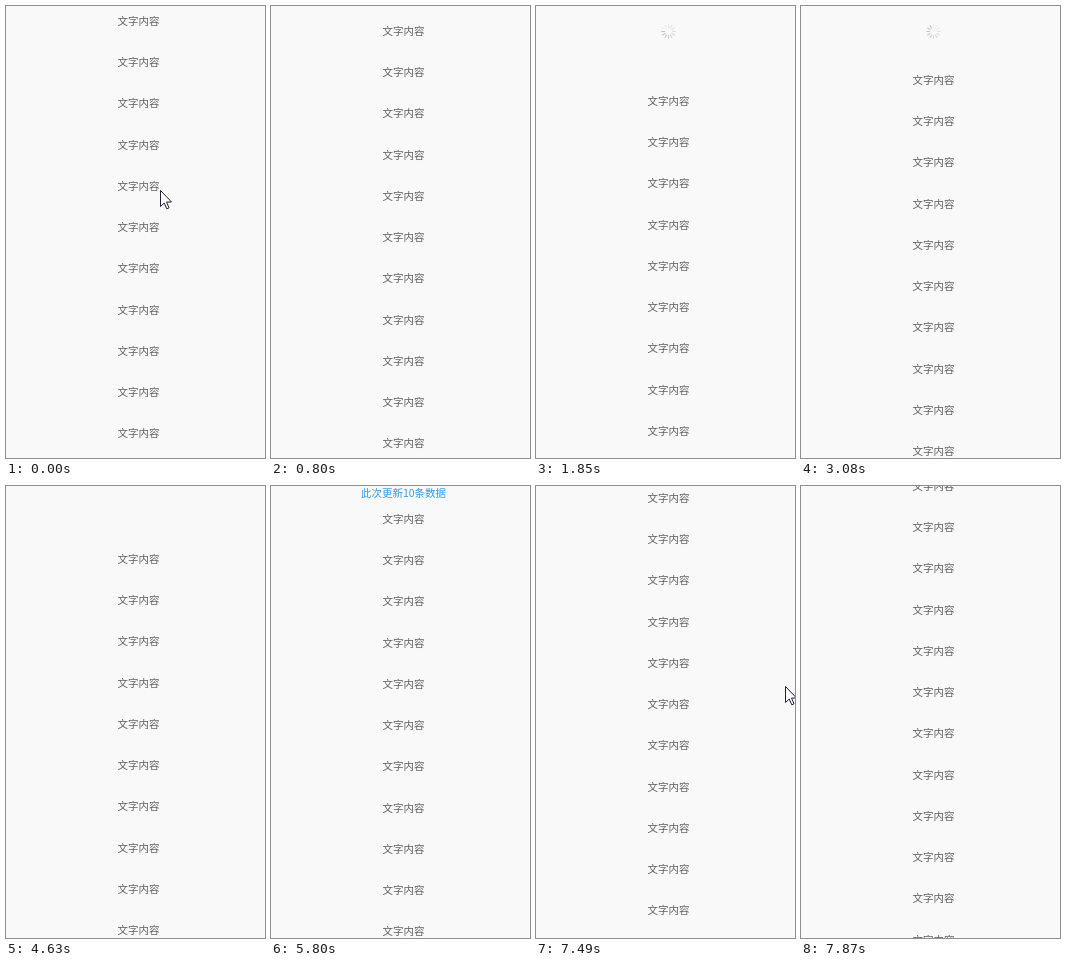
An HTML page that plays this animation: 259 px wide and 452 px high, repeating every 8 s.

```html
<!DOCTYPE html>
<html lang="zh">
<head>
<meta charset="utf-8">
<title>Pull to refresh</title>
<style>
  html, body { margin: 0; width: 100%; height: 100%; overflow: hidden; background: #f9f9f9; }
  #stage {
    position: relative; width: 259px; height: 452px; overflow: hidden;
    font: 10.5px "Noto Sans CJK SC", "Noto Sans CJK", "Noto Sans CJK JP", sans-serif;
    text-align: center; white-space: nowrap;
  }
  #list, #notice { position: absolute; left: 0; width: 265px; }
  #list { top: -6.1px; color: #606060; }
  #list div { height: 41.25px; line-height: 41.25px; }
  #notice { top: -1px; height: 15px; line-height: 15px; color: #2f9ae6; }
  svg { position: absolute; left: 0; top: 0; overflow: visible; }
</style>
</head>
<body>
<div id="stage">
  <div id="list"></div>
  <div id="notice">此次更新10条数据</div>
  <svg width="259" height="452">
    <g id="spinner" stroke="#a8a8a8" stroke-width="1.2" stroke-linecap="round"></g>
    <path id="cursor" d="M.5 .5V16.5L4.2 13L6.8 18.8L9 17.8L6.5 12H11.5Z"
          fill="#fff" stroke="#20203c" stroke-width="1"/>
  </svg>
</div>
<script>
const LOOP = 8000;
const REST = 59.25;
const NOTICE_HEIGHT = 18;

// Moments at which the picture refreshes.
const ticks = [
  0, 150, 270, 390, 510, 660, 800, 940, 1070, 1190, 1330, 1460, 1580, 1730, 1850,
  2000, 2120, 2240, 2390, 2540, 2660, 2810, 2930, 3080, 3200, 3320, 3470, 3610, 3760, 3910,
  4060, 4210, 4360, 4480, 4630, 4750, 4900, 5020, 5320, 5440, 5560, 5680, 5800,
  6410, 6540, 6660, 7360, 7490, 7610, 7730, 7870
];

const linear = p => p;
const easeIn = p => p * p;
const easeOut = p => 1 - (1 - p) ** 2;
const smooth = p => p * p * (3 - 2 * p);

// List offset: start, end, from, to, easing
const moves = [
  [660, 1190, 0, 38, linear],
  [1190, 1580, 38, 130, easeOut],
  [1580, 2000, 130, REST, smooth],
  [4580, 5020, REST, NOTICE_HEIGHT, smooth],
  [6340, 6660, NOTICE_HEIGHT, -0.7, smooth],
  [7230, 7870, -0.7, -14.7, easeIn]
];

const byId = id => document.getElementById(id);
const list = byId('list'), notice = byId('notice');
const spinner = byId('spinner'), cursor = byId('cursor');

list.innerHTML = '<div>文字内容</div>'.repeat(13);
spinner.innerHTML = Array.from({ length: 12 }, (_, i) =>
  `<path d="M0 -4V-6.8" transform="rotate(${i * 30})" opacity="${0.12 + i * 0.05}"/>`).join('');

const progress = (t, start, end) => Math.min(1, Math.max(0, (t - start) / (end - start)));
const show = (el, on) => { el.style.visibility = on ? 'visible' : 'hidden'; };

function listOffset(t) {
  let y = 0;
  for (const [start, end, from, to, ease] of moves) {
    if (t >= start) y = from + (to - from) * ease(progress(t, start, end));
  }
  return y;
}

function cursorPosition(t) {
  if (t < 660) {
    const p = progress(t, 0, 510);
    return [154 - 72 * p * (1 - p), 184 - 199 * p];
  }
  if (t >= 7360 && t < 7870) return [254 - 15 * progress(t, 7360, 7730), 200];
  return null;
}

function draw(t) {
  const y = listOffset(t);
  list.style.transform = `translateY(${y}px)`;

  show(notice, t >= 5320 && t < 6660);
  notice.style.opacity = progress(t, 5200, 5800);
  notice.style.transform = `translateY(${y - NOTICE_HEIGHT}px)`;

  show(spinner, t >= 1730 && t < 4480);
  spinner.setAttribute('transform', `translate(132.5 25.5) rotate(${Math.floor(t * 12 / 1000) * 30})`);

  const at = cursorPosition(t);
  show(cursor, at);
  if (at) cursor.setAttribute('transform', `translate(${at.map(Math.round)})`);
}

const begin = performance.now();
function frame() {
  const t = (performance.now() - begin) % LOOP;
  draw(ticks.findLast(tick => tick <= t) ?? 0);
  requestAnimationFrame(frame);
}
frame();
</script>
</body>
</html>
```
